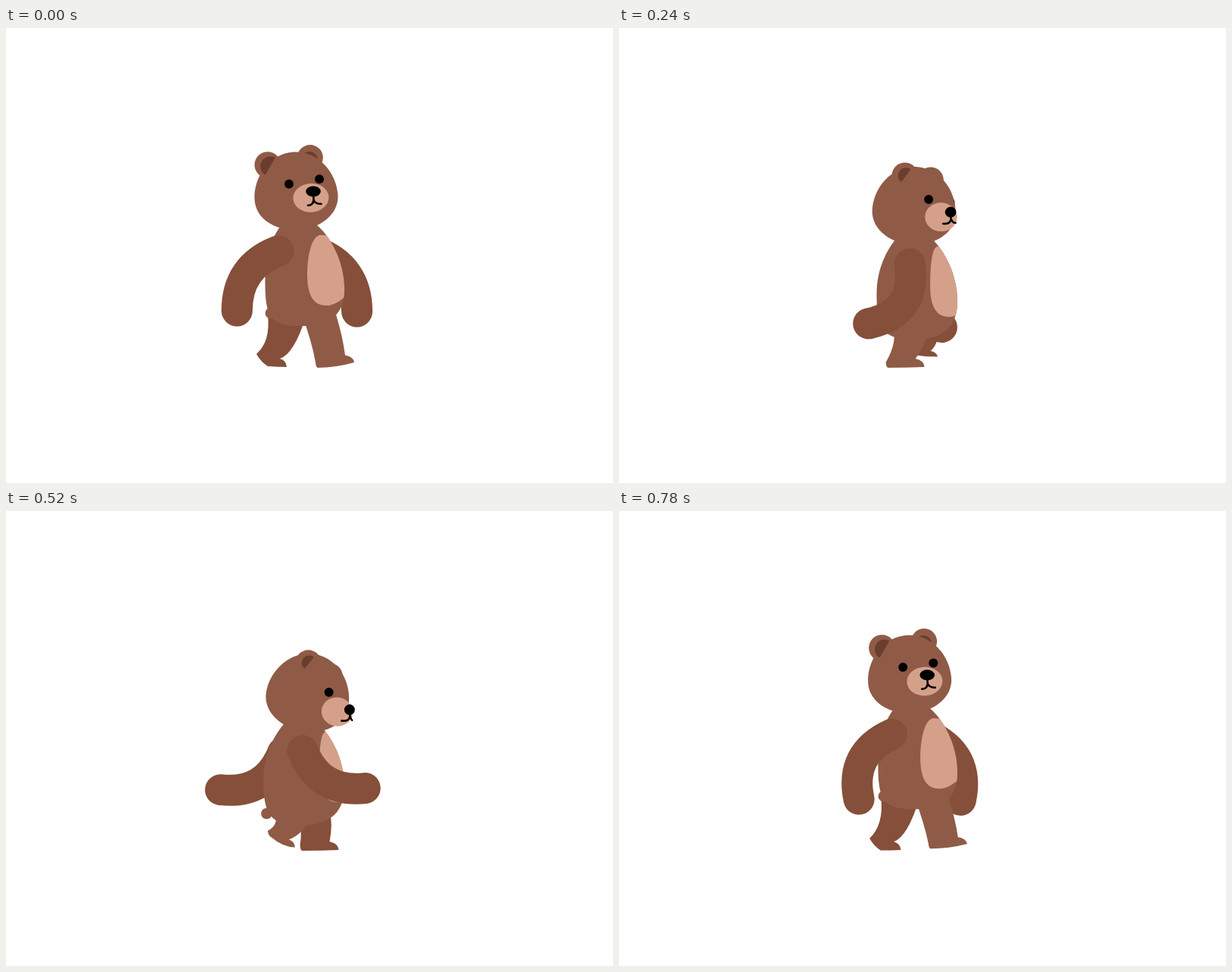
Animation, 800 px wide and 600 px high, one loop 800 ms. Source, as an HTML page with a canvas:

```html
<!DOCTYPE html>
<html lang="en">
<head>
<meta charset="utf-8">
<title>Walking bear</title>
<style>
  html, body { margin: 0; width: 100%; height: 100%; overflow: hidden; background: #fff; }
  canvas { display: block; }
</style>
</head>
<body>
<canvas id="stage" width="800" height="600"></canvas>
<script>
const LOOP = 800, STEP = 20, GROUND = 448;
const FUR = '#8f5b47', LIMB = '#854f3a', CREAM = '#d5a08a', EAR = '#6a3e2d', INK = '#000';
// Phase lags in radians: the head turns a little, and nods well, behind the steps.
const TURN = 0.06, NOD = 0.4;
const ctx = document.getElementById('stage').getContext('2d');

const phase = t => 2 * Math.PI * t / LOOP;
const radians = deg => deg * Math.PI / 180;

// Eases from a to b and back once per loop; mid is added halfway, both ways.
const swinger = t => (a, b, lag = 0, mid = 0) => {
  const p = phase(t) - lag;
  return a + (b - a) * (1 - Math.cos(p)) / 2 + mid * Math.sin(p) ** 2;
};

// Rises from 0 to 1 and back within part of the loop.
function pulse(t, from, to, skew = 1) {
  const s = ((t - from) % LOOP + LOOP) % LOOP / (to - from);
  return s < 1 ? Math.sin(Math.PI * s ** skew) : 0;
}

function oval(x, y, rx, ry, color, turn = 0) {
  ctx.fillStyle = color;
  ctx.beginPath();
  ctx.ellipse(x, y, rx, ry, turn, 0, 2 * Math.PI);
  ctx.fill();
}
const disc = (x, y, r, color) => oval(x, y, r, r, color);

function fillPath(path, color) {
  ctx.fillStyle = color;
  ctx.fill(path);
}

function clipped(path, draw) {
  ctx.save();
  ctx.clip(path);
  draw();
  ctx.restore();
}

// A pendulum whose bend flips quickly as it changes direction.
function drawArm(t, x, y) {
  const length = 96, p = phase(t);
  const angle = radians(59 * Math.cos(p - 4.084));
  const bend = 46 * Math.tanh(2.2 * Math.cos(p - 2));
  const sin = Math.sin(angle), cos = Math.cos(angle);
  ctx.strokeStyle = LIMB;
  ctx.lineWidth = 41;
  ctx.beginPath();
  ctx.moveTo(x, y);
  ctx.quadraticCurveTo(
    x + sin * length / 2 + cos * bend, y + cos * length / 2 - sin * bend,
    x + sin * length, y + cos * length);
  ctx.stroke();
}

// Stance, push-off on the ball of the foot, then the foot is carried forward.
function drawLeg(t, bob, color) {
  const swing = swinger(t);
  const push = pulse(t, 270, 530), bend = pulse(t, 270, 760), toeLift = 14 * pulse(t, 490, 850);
  const heelX = swing(408, 330, -0.05, -4);
  const heelY = GROUND - 7 - 20 * pulse(t, 270, 800, 1.2);
  const soleX = heelX + 3 + 12 * push, soleY = Math.min(GROUND, heelY + 7 + 9 * push);
  const toeX = heelX + 51 - 15 * bend, toeY = GROUND - 1 - toeLift;
  const stepX = toeX - 12 + 4 * bend, stepY = toeY - 11 + toeLift / 4;
  const hipY = 378 + 26 * bob, backX = swing(390, 345), frontX = swing(435, 396);

  const leg = new Path2D();
  leg.moveTo(backX + 5, 360);
  leg.lineTo(backX, hipY);
  leg.quadraticCurveTo(swing(403, 349), 413, heelX, heelY);
  leg.quadraticCurveTo((heelX + soleX) / 2 - 1, (heelY + soleY) / 2 + 3, soleX, soleY);
  leg.quadraticCurveTo((soleX + toeX) / 2, Math.max(soleY, toeY), toeX, toeY);
  leg.quadraticCurveTo(toeX - 1, stepY + 2, stepX, stepY);
  leg.quadraticCurveTo(swing(444, 380), swing(408, 430), frontX, hipY);
  leg.lineTo(frontX - 5, 360);
  fillPath(leg, color);
}

function torsoPath(k) {
  const y = 24 * k, left = 341.5 - 3 * k, low = 393 + 27 * k;
  const p = new Path2D();
  p.moveTo(372 + 7 * k, 250 + y);
  p.bezierCurveTo(350 + 7 * k, 270 + y, left, 300 + y, left, 335 + y);
  p.bezierCurveTo(left, 384 + y, 350, low, 390, low);
  p.bezierCurveTo(430, low, 446, 375 + y, 446, 345 + y);
  p.bezierCurveTo(446, 310 + y, 429, 270 + y, 397, 250 + y);
  return p;
}

function bellyPath(k) {
  const x = 20 * k, y = 23 * k, topX = 415 + 8 * k, left = 397 + x;
  const p = new Path2D();
  p.moveTo(topX, 273 + y);
  p.bezierCurveTo(topX - 12 + 6 * k, 273 + y, left, 300 + y, left, 325 + y);
  p.bezierCurveTo(left, 352 + y, left + 8, 366 + y, left + 25, 366 + y);
  p.bezierCurveTo(left + 35, 366 + y, left + 43, 360 + y, left + 53, 352 + y);
  p.lineTo(left + 63, 300 + y);
  p.bezierCurveTo(left + 43, 280 + y, topX + 13, 273 + y, topX, 273 + y);
  return p;
}

function headPath(tilt) {
  const egg = new Path2D('M0-50C32-50 55-20 55 10C55 36 28 53 0 53C-28 53-55 36-55 10C-55-20-32-50 0-50Z');
  const p = new Path2D();
  p.addPath(egg, new DOMMatrix().rotate(tilt));
  return p;
}

function drawNearEar(swing) {
  const x = swing(-37.5, 5, 0.18, 1), y = swing(-33, -36, TURN, -3.5);
  const lean = radians(swing(30, 41, TURN) - 90);
  disc(x, y, 17.3, FUR);
  ctx.fillStyle = EAR;
  ctx.beginPath();
  ctx.arc(x + swing(3.5, 0.5), y + swing(1.8, -0.8), swing(13, 9.2, TURN), lean + Math.PI, lean);
  ctx.fill();
}

function drawMouth(swing, x, y) {
  const dropX = x + 0.5, dropY = y + swing(11.5, 8);
  ctx.strokeStyle = INK;
  ctx.lineWidth = 2.6;
  ctx.beginPath();
  ctx.moveTo(x, y);
  ctx.lineTo(dropX, dropY);
  ctx.quadraticCurveTo(dropX - 1, dropY + 7, dropX + swing(-7.5, -12), dropY + swing(7, 5.5));
  ctx.moveTo(dropX, dropY);
  ctx.quadraticCurveTo(dropX + 2, dropY + 5, dropX + swing(10, -1, TURN, 3), dropY + 5);
  ctx.stroke();
}

function drawHead(swing) {
  const tilt = swing(-4, 11, NOD), head = headPath(tilt);
  const farEarX = swing(18, 28, 0.6), farEarY = swing(-43, -18, 0.35, -1.5);
  const noseX = swing(23, 59, TURN, 2.5), noseY = swing(1.5, 26.5, NOD, -3);

  ctx.save();
  ctx.translate(swing(381, 400, 0.45), swing(213.5, 244, 0.04));
  disc(farEarX, farEarY, 17, FUR);
  disc(farEarX - 1, farEarY + 3, 11, EAR);
  fillPath(head, FUR);
  drawNearEar(swing);
  oval(swing(20, 40.5, 0, 2), swing(10, 28.5, NOD, -2), swing(23.5, 20), 19, CREAM, radians(tilt));
  disc(swing(-9, 33.8, TURN, 1.2), swing(-7.5, 2.5, NOD, -4), 6, INK);
  clipped(head, () => disc(swing(31, 70, TURN, 2.5), swing(-15, 6, NOD), 6, INK));
  oval(noseX, noseY, swing(9.8, 6.2), 7, INK);
  drawMouth(swing, noseX, noseY);
  ctx.restore();
}

function drawBear(t) {
  const swing = swinger(t), bob = swing(0, 1);
  const torso = torsoPath(bob);
  drawArm(t + LOOP / 2, swing(408, 362, TURN, -9), swing(295, 319, TURN, 6));
  drawLeg(t + LOOP / 2, bob, LIMB);
  disc(swing(349, 342), swing(376, 405), 7.3, FUR);
  fillPath(torso, FUR);
  drawLeg(t, bob, FUR);
  clipped(torso, () => fillPath(bellyPath(bob), CREAM));
  drawHead(swing);
  drawArm(t, swing(359, 398, TURN), swing(294, 321, TURN));
}

function frame() {
  const t = Math.floor(performance.now() % LOOP / STEP) * STEP;
  ctx.fillStyle = '#fff';
  ctx.fillRect(0, 0, 800, 600);
  ctx.lineCap = 'round';
  ctx.lineJoin = 'round';
  drawBear(t);
  requestAnimationFrame(frame);
}
frame();
</script>
</body>
</html>
```
